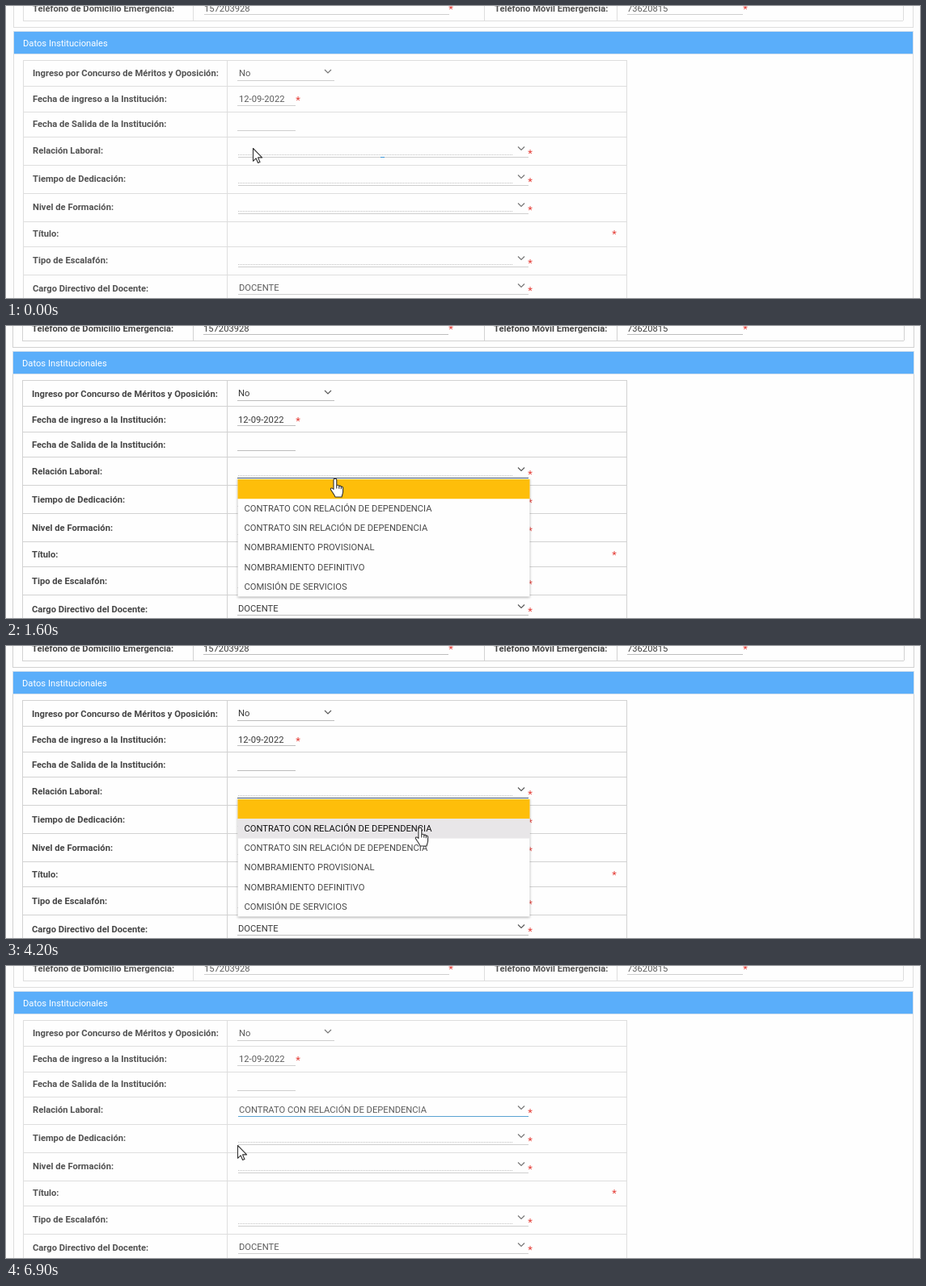
Animation of 1130x362 px, one loop 7 s. Source, as an HTML page:

```html
<!DOCTYPE html>
<html lang="es">
<head>
<meta charset="utf-8">
<title>Datos Institucionales</title>
<style>
  html, body { margin: 0; width: 100%; height: 100%; overflow: hidden; background: #fdfdfd; }
  svg { display: block; width: 1130px; height: 362px; }
  text { font: 11.2px Roboto, sans-serif; white-space: pre; }
  .label { font-weight: 700; fill: #444; }
  .value { fill: #3a3a3a; }
  .star { font-size: 13px; fill: #e5403a; text-anchor: middle; }
  .chev { fill: none; stroke: #5a5a5a; stroke-width: 1.2; }
  .dots { stroke: #c2c2c2; stroke-dasharray: 1 1; }
  .soft .label { fill: #525252; }
  .soft .value { fill: #5c5c5c; }
  .soft .chev { stroke: #777; }
  .panel { fill: #fefefe; filter: drop-shadow(0 1px 1.5px rgba(0, 0, 0, .35)); }
  .shape { fill: #fff; stroke: #333; stroke-width: 1.1; stroke-linejoin: round; }
</style>
</head>
<body>
<svg id="stage" viewBox="0 0 1130 362"></svg>
<script>
const LOOP = 7000, TICK = 100, MENU_TOP = 190, ITEM = 24.25;

const ROWS = [
  ['Ingreso por Concurso de Méritos y Oposición:', 'short'],
  ['Fecha de ingreso a la Institución:', 'date'],
  ['Fecha de Salida de la Institución:', 'blank'],
  ['Relación Laboral:', 'focus'],
  ['Tiempo de Dedicación:', 'list'],
  ['Nivel de Formación:', 'list'],
  ['Título:', 'title'],
  ['Tipo de Escalafón:', 'list'],
  ['Cargo Directivo del Docente:', 'post']
];
const HEIGHT = { short: 32, date: 32, blank: 31, title: 31 }, LIST_HEIGHT = 35;
const OPTIONS = ['CONTRATO CON RELACIÓN DE DEPENDENCIA', 'CONTRATO SIN RELACIÓN DE DEPENDENCIA',
  'NOMBRAMIENTO PROVISIONAL', 'NOMBRAMIENTO DEFINITIVO', 'COMISIÓN DE SERVICIOS'];

const rect = (x, y, w, h, fill) =>
  `<rect x="${x}" y="${y}" width="${w}" height="${h}" fill="${fill}"/>`;
const text = (cls, x, y, s) => `<text class="${cls}" x="${x}" y="${y}">${s}</text>`;
const star = (x, y) => text('star', x, y, '*');
const chevron = (x, y) => `<path class="chev" d="M${x - 4} ${y - 2}l4 4 4-4"/>`;
const columns = (xs, y, h, fill) => xs.map(x => rect(x, y, 1, h, fill)).join('');

function list(x, y, value, ink) {
  return (value ? text('value', 287 + x, y, value) : `<path class="dots" d="M287 ${y + 1.5}H627"/>`) +
    rect(286 + x, y + 4, 360 - x, 1, ink) + chevron(637, y - 6.5) + star(648, y + 4);
}

function focusLine(x, y, kind) {
  if (kind === 'dot') return rect(463, y + 4, 5, 1, '#3f97d8');
  return rect(286 + x, y + 4, 360 - x, 1, kind === 'open' ? '#4a5d78' : '#5aa3d2');
}

// x: inset, y: baseline, end: lower border of the row
function field(kind, x, y, end, { ink, chosen, focus }) {
  switch (kind) {
    case 'short': return text('value', 287 + x, 87, 'No') + rect(286, end - 7, 120, 1, ink) + chevron(398, y - 6);
    case 'date': return text('value', 287 + x, y, '12-09-2022') + rect(286, end - 8, 72, 1, ink) + star(361, y + 2);
    case 'blank': return rect(286, end - 8, 72, 1, ink);
    case 'title': return star(752, y + 1);
    case 'post': return list(x, y - 1, 'DOCENTE', ink);
    case 'focus': return list(x, y, chosen, ink) + focusLine(x, y, focus);
    default: return list(x, y, '', ink);
  }
}

// soft: slightly inset, paler layout; a chosen value makes its row one pixel lower
function form(id, { soft = 0, chosen = '', focus = '' }) {
  const edge = soft ? '#dedede' : '#d2d2d2', ink = soft ? '#cfcfcf' : '#bdbdbd';
  const left = 8 + soft, right = 1122 - soft, inner = 20 + soft, wide = right - left;
  let s = rect(left, 0, wide, 362, '#fefefe') +
    columns([left, right], 0, 27, edge) + rect(left, 26, wide, 1, edge) +
    columns([inner, 231, 591, 755, 1110 - soft], 0, 18, edge) + rect(inner, 18, 1090 - soft * 2, 1, edge) +
    text('label', 32 + soft, 7, 'Teléfono de Domicilio Emergencia:') +
    text('value', 244 + soft, 7, '157203928') + rect(244 + soft, 10, 303, 1, ink) + star(550, 8) +
    text('label', 603 + soft, 7, 'Teléfono Móvil Emergencia:') +
    text('value', 768, 7, '73620815') + rect(768, 10, 143, 1, ink) + star(914, 8);
  s += rect(left, 31, wide + 1, 29, '#d3e0ec') + rect(left + 1, 32, wide - 1, 27, '#5aaefa') +
    columns([left, right], 60, 302, edge) +
    `<text x="${20 + soft}" y="50" fill="#fff">Datos Institucionales</text>`;
  s += rect(inner, 67, 748 - soft, 1, edge) + columns([inner, 273, 767], 67, 295, edge);

  let end = 67;
  for (const [label, kind] of ROWS) {
    end += HEIGHT[kind] || LIST_HEIGHT - (kind === 'focus' && chosen ? 1 : 0);
    const y = end - (HEIGHT[kind] ? 11 : 13) - soft;
    s += rect(inner, end, 748 - soft, 1, edge) + text('label', 32 + soft, y, label) +
      field(kind, soft, y, end, { ink, chosen, focus });
  }
  return `<g id="${id}"${soft ? ' class="soft"' : ''}>${s}</g>`;
}

function menu() {
  const items = OPTIONS.map((s, i) => {
    const y = MENU_TOP + (i + 1) * ITEM;
    return `<rect id="back${i}" x="286.5" y="${y}" width="361" height="${ITEM}" fill="#e8e6e8"/>` +
      `<text id="item${i}" x="294.5" y="${Math.round(y + 15.7)}">${s}</text>`;
  });
  return `<g id="menu"><rect class="panel" x="286.5" y="189" width="361" height="146.5"/>` +
    rect(286.5, MENU_TOP, 361, ITEM, '#febe0a') + items.join('') + '</g>';
}

const pointer = `<g id="pointer">
  <path id="arrow" class="shape" d="M.5 .5V16.3L4.1 12.8 6.6 18.5 9 17.5 6.5 11.9H11.6Z"/>
  <g id="hand" class="shape">
    <path d="M-2 13.5V2a1.9 1.9 0 0 1 3.8 0V9C2 7.8 4.6 8 4.8 9.8 5.2 8.6 7.3 9 7.4 10.6 8 9.6 9.6 10 9.6 11.8V16.5C9.6 19 8.3 20.5 8.1 23H0C-.5 20.5-3.8 16.8-5.4 14-6.4 12-4 11-2 13.5Z"/>
    <path fill="none" d="M1.8 9v3.4M4.8 9.8v3M7.4 10.6v2.6"/>
  </g></g>`;

document.getElementById('stage').innerHTML =
  form('start', { soft: 1, focus: 'dot' }) +
  form('open', { focus: 'open' }) +
  form('chosen', { chosen: OPTIONS[0] }) +
  form('end', { soft: 1, chosen: OPTIONS[0] }) +
  menu() + pointer;

const $ = id => document.getElementById(id);
const clamp = v => Math.max(0, Math.min(1, v));
const show = (id, on) => $(id).style.visibility = on ? 'visible' : 'hidden';

// stops of the pointer: [from ms, until ms, x, y], straight moves between them
const STOPS = [[0, 600, 305, 176], [900, 1500, 409, 178], [2300, 2300, 395, 266], [2700, 2700, 490, 236],
  [3000, 3100, 514, 261], [3700, 6300, 512, 225], [6800, LOOP, 286, 222]];

function pointerAt(t) {
  const i = STOPS.findIndex(stop => t <= stop[1]), [from, , x, y] = STOPS[i];
  if (t >= from) return [x, y];
  const [, left, px, py] = STOPS[i - 1], k = (t - left) / (from - left);
  return [px + (x - px) * k, py + (y - py) * k];
}

const isOpen = t => t >= 700 && t < 6300;
const itemAt = t => isOpen(t) ? Math.floor((pointerAt(t)[1] - MENU_TOP) / ITEM) - 1 : -1;

// the highlight fades over the last three ticks
const glow = (i, t) => [0, 1, 2].filter(k => itemAt(t - k * TICK) === i).length / 3;

function sceneAt(t) {
  if (t < 400) return 'start';
  if (t < 6200) return 'open';
  return t < 6900 ? 'chosen' : 'end';
}

function draw() {
  const t = Math.floor(performance.now() % LOOP / TICK) * TICK;
  const scene = sceneAt(t), [x, y] = pointerAt(t), over = isOpen(t) && y >= 189;
  for (const id of ['start', 'open', 'chosen', 'end']) show(id, id === scene);
  $('menu').style.opacity = Math.min(clamp((t - 600) / 380), clamp((6300 - t) / 200));
  OPTIONS.forEach((_, i) => {
    $('back' + i).style.opacity = glow(i, t);
    $('item' + i).style.fill = itemAt(t) === i ? '#111' : '#484848';
  });
  $('pointer').setAttribute('transform', `translate(${Math.round(x)} ${Math.round(y)})`);
  show('arrow', !over);
  show('hand', over);
  requestAnimationFrame(draw);
}
draw();
</script>
</body>
</html>
```
